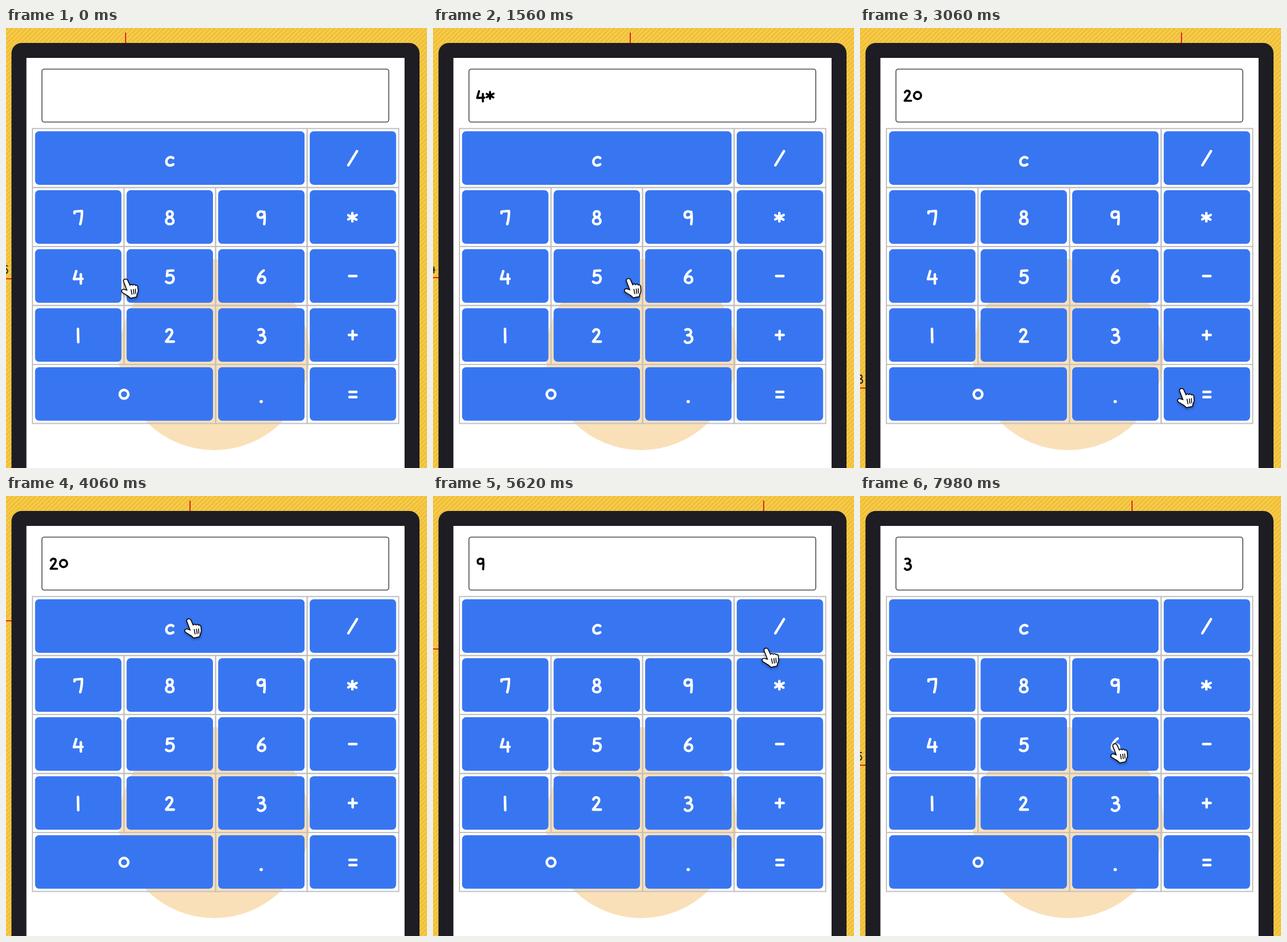
An HTML page with a canvas for the animation above (8 s loop, 732 px wide and 765 px high).

```html
<!DOCTYPE html>
<html lang="en">
<head>
<meta charset="utf-8">
<title>Calculator</title>
<style>
  html, body { margin: 0; width: 100%; height: 100%; overflow: hidden; background: #f1c033; }
  canvas { display: block; }
</style>
</head>
<body>
<canvas id="stage" width="732" height="765" role="img"
  aria-label="Calculator keys: c / 7 8 9 * 4 5 6 - 1 2 3 + 0 . ="></canvas>
<script>
const W = 732, H = 765, LOOP = 8000;
const LAG = 40;                                  // rulers trail the pointer
const SETTLE = 140, HOLD = 250, TRAVEL = 640;    // pointer rhythm around a press
const canvas = document.getElementById('stage');
const ctx = canvas.getContext('2d');

// Handwritten characters as pen strokes around the key centre.
const strokes = {
  'c': 'M6 0C1 -4 -6 0 -6 6.5C-6 13 1 14.5 6 11',
  '/': 'M7 -12L-8 12.5',
  '7': 'M-6.5 -6.5V-9.5L6.5 -10.5Q6.5 2 3.5 12.5',
  '8': 'M0 -10C-6.5 -10 -6.5 -1 0 .5C8.5 2 8.5 12.5 0 12.5C-8.5 12.5 -8.5 2 0 .5C6.5 -1 6.5 -10 0 -10Z',
  '9': 'M5 -7C1 -12 -6.5 -9.5 -6.5 -4C-6.5 2 1 3 5 -2M5 -9C6 -1 6 6 5 12.5',
  '*': 'M-1 -7V7.5M-8 -3L6 4.5M6.5 -3.5L-8 4',
  '4': 'M-3.5 -8.5L-7.5 5.5L7.5 5M4.5 -3V13',
  '5': 'M6 -9.5L-4 -9L-5 0C2 -4 7.5 0 6.5 6C5.5 13 -2 13.5 -6.5 10',
  '6': 'M4 -9.5C-2 -6 -6 1 -6 6C-6 14 6.5 14 6.5 6.5C6.5 -1 -3 -.5 -5 4',
  '-': 'M-6.5 0H6',
  '1': 'M-.5 -10.5L0 12.5',
  '2': 'M-6 -6C-3 -12 5 -10 4 -4C3 1 -3 6 -6.5 11.5H7',
  '3': 'M-5 -9C2 -12 7 -6.5 3.5 -2Q1 1 -2 .5C5 -.5 8 5 6 9.5C3 15 -4 14.5 -6 11',
  '+': 'M-7 0H6.5M-.5 -7V7.5',
  '0': 'M7.5 .5A7.5 7.5 0 1 1 -7.5 .5A7.5 7.5 0 1 1 7.5 .5Z',
  '.': 'M-.5 13.2h.4',
  '=': 'M-6 -3.5H6M-6 5.5H6'
};
const glyphs = {};
for (const ch in strokes) glyphs[ch] = new Path2D(strokes[ch]);

const hand = new Path2D('M-1.5 2C-1.5 -1 3 -2 4.5 1L9 11C10 8 13 8 14 10.5' +
  'C15 8 18 8.5 18.5 11C20 9 22 10.5 22 13L22.5 19C22.5 23 20 24 20 29L10 31' +
  'C7 27 0 24 -4 21C-6 18 -3 16 0 17.5L5 19Z');
const fingers = new Path2D('M11 17l1.5 8M15 16.5l1 8M18.5 16l.5 7.5');

// A repeated letter is one key spanning several cells.
const CELL_W = 159.2, CELL_H = 102.55;
const keys = {};
['ccc/', '789*', '456-', '123+', '00.='].forEach((line, row) => {
  for (const ch of new Set(line)) {
    const w = CELL_W * line.split(ch).slice(1).length;
    const x = 46 + CELL_W * line.indexOf(ch), y = 174.8 + CELL_H * row;
    keys[ch] = { x, y, w, h: CELL_H, cx: x + w / 2, cy: y + CELL_H / 2 };
  }
});

// Presses: key, time, and where on the key relative to its centre.
const presses = [
  ['4', 400], ['*', 1000], ['5', 1680, 55, 4], ['=', 2500, -44, -10], ['c', 4200, 33, -13],
  ['9', 4980], ['/', 5760, -24, 38], ['3', 6560, 33, -3], ['=', 7410], ['c', 8440]
].map(([key, time, dx = 0, dy = 0]) =>
  ({ key, time, x: keys[key].cx + dx, y: keys[key].cy + dy }));

const ease = p => p * p * (3 - 2 * p);
const clamp = v => Math.min(1, Math.max(0, v));

function pointer(t) {
  let from = { x: 208, y: 436, time: -HOLD };
  for (const to of presses) {
    const arrive = to.time - SETTLE;
    const depart = Math.max(from.time + HOLD, arrive - TRAVEL);
    if (t < arrive) {
      const e = ease(clamp((t - depart) / (arrive - depart)));
      return [from.x + (to.x - from.x) * e, from.y + (to.y - from.y) * e];
    }
    from = to;
  }
  return [from.x, from.y];
}

function calculate(text) {
  const [, a, op, b] = text.match(/(\d+)(\D)(\d+)/);
  return String(op === '*' ? a * b : a / b);
}

function display(t) {
  let text = '';
  for (const { key, time } of presses) {
    if (time > t) break;
    text = key === 'c' ? '' : key === '=' ? calculate(text) : text + key;
  }
  return text;
}

function box(c, x, y, w, h, r, color) {
  c.fillStyle = color;
  c.beginPath();
  c.roundRect(x, y, w, h, r);
  c.fill();
}

function glyph(c, ch, x, y, scale, color, weight = 4.4) {
  c.save();
  c.translate(x, y);
  c.scale(scale, scale);
  c.strokeStyle = color;
  c.lineWidth = ch === '.' ? weight + 1 : weight;
  c.lineCap = c.lineJoin = 'round';
  c.stroke(glyphs[ch]);
  c.restore();
}

function backdrop(c) {
  c.fillStyle = '#f1c033';
  c.fillRect(0, 0, W, H);
  c.strokeStyle = '#f6d678';
  c.lineWidth = 1.2;
  c.beginPath();
  for (let x = 0; x < W + H; x += 8) {
    c.moveTo(x, 0);
    c.lineTo(x - H, H);
  }
  c.stroke();
}

function device(c) {
  box(c, 9.5, 26, 709.5, H, 18, '#1e1d23');
  c.fillStyle = '#fff';
  c.fillRect(35.5, 52, 657.5, H);
  c.fillStyle = '#fae0b8';
  c.beginPath();
  c.arc(362, 568, 166, 0, 2 * Math.PI);
  c.fill();
  c.strokeStyle = '#c1c1c3';
  c.lineWidth = 2;
  for (const k of Object.values(keys)) c.strokeRect(k.x, k.y, k.w, k.h);
  for (const [ch, k] of Object.entries(keys)) {
    box(c, k.x + 4.5, k.y + 4.7, k.w - 9, k.h - 9.4, 7, '#3876f1');
    glyph(c, ch, k.cx, k.cy, 1, '#fff');
  }
  c.strokeStyle = '#4a4a4c';
  c.lineWidth = 1.6;
  c.beginPath();
  c.roundRect(62.5, 71.5, 603, 92, 4);
  c.stroke();
}

function layer(draw) {
  const el = document.createElement('canvas');
  el.width = W;
  el.height = H;
  draw(el.getContext('2d'));
  return el;
}
const back = layer(backdrop), front = layer(device);

function rulers(x, y) {
  ctx.fillStyle = '#e3211c';
  ctx.fillRect(Math.round(x) - 1, 8, 2, 20);
  ctx.fillRect(0, Math.round(y) - 1, 12, 2);
  const label = [...String(Math.round(y * 0.331 + 0.25))];
  const advance = ch => ch === '1' ? 7 : 10.5;
  let left = -10 - label.reduce((sum, ch) => sum + advance(ch), 0) / 2;
  for (const ch of label) {
    glyph(ctx, ch, left + advance(ch) / 2, y - 16.5, 0.62, '#222', 3.2);
    left += advance(ch);
  }
}

function cursor(x, y) {
  ctx.save();
  ctx.translate(x - 1.5, y + 2);
  ctx.lineJoin = ctx.lineCap = 'round';
  ctx.strokeStyle = '#000';
  ctx.shadowColor = 'rgba(0,0,0,.45)';
  ctx.shadowBlur = 4;
  ctx.shadowOffsetY = 2;
  ctx.lineWidth = 3;
  ctx.stroke(hand);
  ctx.shadowColor = 'transparent';
  ctx.fillStyle = '#fff';
  ctx.fill(hand);
  ctx.lineWidth = 1.5;
  ctx.stroke(fingers);
  ctx.restore();
}

function render(t) {
  ctx.drawImage(back, 0, 0);
  rulers(...pointer(t - LAG));
  ctx.drawImage(front, 0, 0);
  [...display(t)].forEach((ch, i) => glyph(ctx, ch, 83 + 17 * i, 117, 0.83, '#000'));
  cursor(...pointer(t));
}

const start = performance.now();
function tick() {
  render((performance.now() - start) % LOOP);
  requestAnimationFrame(tick);
}
tick();
</script>
</body>
</html>
```
